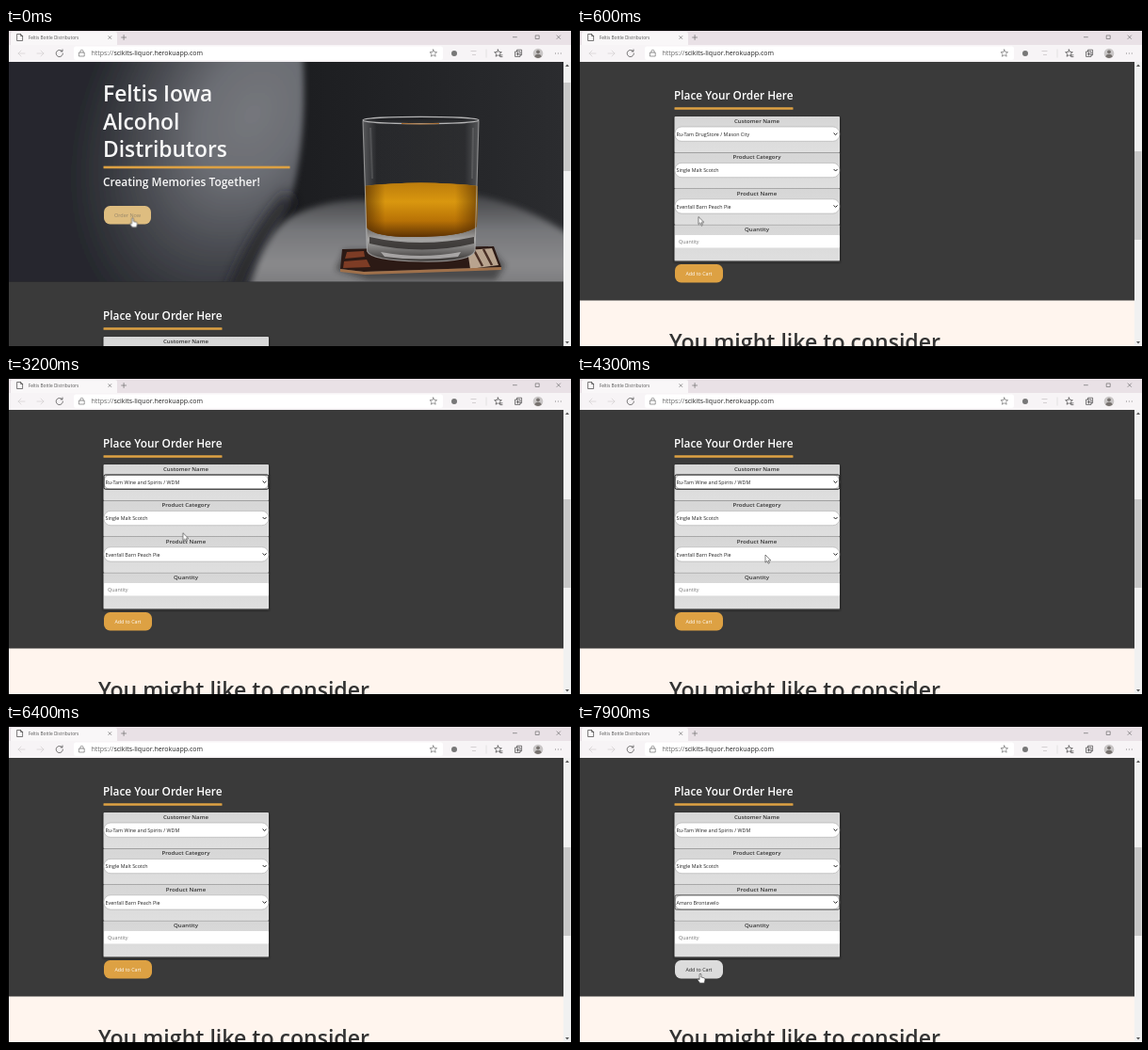
These frames come from a looping animation (600x340 px, 8 s). An HTML page:

```html
<!DOCTYPE html>
<html lang="en">
<head>
<meta charset="utf-8">
<title>Feltis Bottle Distributors</title>
<style>
html, body { margin: 0; width: 100%; height: 100%; overflow: hidden; background: #000; }
svg { display: block; width: 600px; height: 340px; font-family: "Open Sans", "Noto Sans", sans-serif; }
.h { font-weight: 600; }
.mid { text-anchor: middle; }
.label { font-size: 6.1px; font-weight: 600; fill: #333; text-anchor: middle; }
.value { font-size: 5.35px; fill: #222; }
.line { fill: none; stroke: #666; stroke-width: .65; stroke-linecap: round; stroke-linejoin: round; }
.faint { stroke: #cfcbcd; }
.dark { stroke: #333; }

/* 80 ms of the 8 s loop = 1% */
.page, .thumb, .arrow, .hand, .shop1, .shop2, .ring1, .drink1, .drink2 { animation: 8s step-end infinite; }
.page { animation-name: scroll; }
.thumb { animation-name: thumb; }
.arrow { animation-name: arrow; }
.hand { animation-name: hand; }
.shop1 { animation-name: until-shop; }
.shop2 { animation-name: from-shop; }
.ring1 { animation-name: shop-focus; }
.drink1 { animation-name: until-drink; }
.drink2 { animation-name: from-drink; }
.cursor { animation: move 8s linear infinite; }
.order { animation: order 8s linear infinite; }
.order-text { animation: order-text 8s linear infinite; }
.cart { animation: cart 8s linear infinite; }
.cart-text { animation: cart-text 8s linear infinite; }

@keyframes scroll { 0% { transform: none; } 7.5%, 100% { transform: translateY(-234px); } }
@keyframes thumb { 0% { transform: none; } 7.5%, 100% { transform: translateY(73px); } }
@keyframes arrow {
  0% { opacity: 0; } 7.5% { opacity: 1; } 23.75% { opacity: 0; }
  38.75% { opacity: 1; } 57.5% { opacity: 0; } 86.25% { opacity: 1; } 93.75%, 100% { opacity: 0; }
}
@keyframes hand { 0% { opacity: 1; } 7.5% { opacity: 0; } 93.75%, 100% { opacity: 1; } }
@keyframes until-shop { 0% { opacity: 1; } 38.75%, 100% { opacity: 0; } }
@keyframes from-shop { 0% { opacity: 0; } 38.75%, 100% { opacity: 1; } }
@keyframes shop-focus { 0% { opacity: 0; } 38.75% { opacity: 1; } 57.5%, 100% { opacity: 0; } }
@keyframes until-drink { 0% { opacity: 1; } 86.25%, 100% { opacity: 0; } }
@keyframes from-drink { 0% { opacity: 0; } 86.25%, 100% { opacity: 1; } }
@keyframes move {
  0% { transform: translate(134.5px, 201.5px); }
  5%, 11.25% { transform: translate(129px, 200.5px); animation-timing-function: ease-in-out; }
  21.25% { transform: translate(228.5px, 125.5px); }
  22.5%, 38.74% { transform: translate(228.5px, 117.5px); }
  38.75% { transform: translate(186px, 163px); animation-timing-function: ease-out; }
  53.75%, 57.5% { transform: translate(200px, 190px); }
  57.51%, 88% { transform: translate(160px, 134px); animation-timing-function: ease-in-out; }
  96%, 100% { transform: translate(131px, 265px); }
}
@keyframes order { 0% { fill: #debd80; } 5%, 100% { fill: #dcdcdc; } }
@keyframes order-text { 0% { fill: #96866a; } 5%, 100% { fill: #222; } }
@keyframes cart { 0%, 93.75% { fill: #dda143; } 98%, 100% { fill: #dcdcdc; } }
@keyframes cart-text { 0%, 93.75% { fill: #fff; } 98%, 100% { fill: #222; } }
</style>
</head>
<body>
<svg viewBox="0 0 600 340">
  <defs>
    <clipPath id="view"><rect x="3" y="36" width="588.5" height="302"/></clipPath>
    <clipPath id="photo"><rect x="3" y="36" width="589" height="233.5"/></clipPath>
    <linearGradient id="wall" gradientUnits="userSpaceOnUse" x1="300" x2="592">
      <stop offset="0" stop-color="#1c1d20"/><stop offset=".5" stop-color="#232427"/>
      <stop offset="1" stop-color="#2b2c2f"/>
    </linearGradient>
    <radialGradient id="cushion" gradientUnits="userSpaceOnUse" cx="262" cy="92" r="250"
      gradientTransform="rotate(-62 262 92) translate(0 27.6) scale(1 .7)">
      <stop offset="0" stop-color="#75777c"/><stop offset=".3" stop-color="#6b6d73"/>
      <stop offset=".6" stop-color="#4a4c52"/><stop offset=".85" stop-color="#313339"/>
      <stop offset="1" stop-color="#26282d"/>
    </radialGradient>
    <linearGradient id="arm" x2="0" y2="1">
      <stop offset="0" stop-color="#444548"/><stop offset=".3" stop-color="#76777a"/>
      <stop offset=".6" stop-color="#8a8a8c"/><stop offset="1" stop-color="#6a6a6d"/>
    </linearGradient>
    <linearGradient id="whisky" x2="0" y2="1">
      <stop offset="0" stop-color="#bd7d0c"/><stop offset=".35" stop-color="#d9970f"/>
      <stop offset=".7" stop-color="#b87206"/><stop offset="1" stop-color="#5d3203"/>
    </linearGradient>
    <linearGradient id="tint">
      <stop offset="0" stop-color="#4a2600" stop-opacity=".65"/><stop offset=".18" stop-color="#4a2600" stop-opacity="0"/>
      <stop offset=".8" stop-color="#4a2600" stop-opacity="0"/><stop offset="1" stop-color="#4a2600" stop-opacity=".6"/>
    </linearGradient>
    <linearGradient id="base" x2="0" y2="1">
      <stop offset="0" stop-color="#4d4742"/><stop offset=".45" stop-color="#a7a6a5"/>
      <stop offset=".75" stop-color="#6b6968"/><stop offset="1" stop-color="#353230"/>
    </linearGradient>
    <linearGradient id="glass">
      <stop offset="0" stop-color="#fff" stop-opacity=".25"/><stop offset=".12" stop-color="#fff" stop-opacity=".03"/>
      <stop offset=".88" stop-color="#fff" stop-opacity=".03"/><stop offset="1" stop-color="#fff" stop-opacity=".22"/>
    </linearGradient>
    <linearGradient id="row" x2="0" y2="1">
      <stop offset="0" stop-color="#d6d6d6"/><stop offset="1" stop-color="#dfdfdf"/>
    </linearGradient>
    <filter id="soft" x="-30%" y="-30%" width="160%" height="160%"><feGaussianBlur stdDeviation="7"/></filter>
    <filter id="edge" x="-10%" y="-20%" width="120%" height="140%"><feGaussianBlur stdDeviation="3"/></filter>
    <filter id="shade" x="-10%" y="-10%" width="120%" height="120%"><feGaussianBlur stdDeviation="1.2"/></filter>
    <g id="select">
      <rect x="104" y="105" width="174.8" height="15.3" rx="7" fill="#fff" stroke="#aaa" stroke-width=".6"/>
      <path d="M272.6 111.6l2 2 2-2" fill="none" stroke="#222" stroke-width="1"/>
    </g>
    <g id="cell">
      <rect x="103.5" y="94" width="175.5" height="38.3" rx="1" fill="url(#row)"/>
      <path d="M103.5 132.6H279" stroke="#777" stroke-width=".8"/>
    </g>
    <path id="star" d="M0-4l1.1 2.5 2.7.2-2 1.8.6 2.7L0 1.8l-2.4 1.4.6-2.7-2-1.8 2.7-.2z"/>
  </defs>

  <!-- browser -->
  <rect x="3" y="3" width="597" height="335" fill="#f7f4f6"/>
  <rect x="3" y="3" width="597" height="15" fill="#e9e1e6"/>
  <path d="M5 18V6q0-2 2-2H116q2 0 2 2V18z" fill="#f9f7f8"/>
  <path class="line dark" d="M12 6.5h3.6l2 2v5h-5.6zM15.6 6.5v2h2"/>
  <text x="23.8" y="12" font-size="4.75" fill="#555">Feltis Bottle Distributors</text>
  <path class="line" d="M108.8 8.6l3 3m0-3l-3 3M122.6 10h5m-2.5-2.5v5"/>
  <path class="line" d="M538.4 9.7h4M562.6 7.9h3.6v3.6h-3.6zM585 7.9l3.6 3.6m0-3.6l-3.6 3.6"/>
  <rect x="72" y="19.5" width="392" height="14.5" rx="2.5" fill="#fff"/>
  <path class="line faint" d="M20 27h-7m3-3l-3 3 3 3M33 27h7m-3-3l3 3-3 3"/>
  <path class="line dark" d="M59.4 24.5a3.6 3.6 0 1 0 1 2.5M60 22.9v2h-2"/>
  <path class="line" d="M77.8 26h5.4v4h-5.4zM79 26v-1.2a1.5 1.5 0 0 1 3 0V26"/>
  <text x="90.5" y="29.4" font-size="7" fill="#222"><tspan fill="#666">https://</tspan>scikits-liquor.herokuapp.com</text>
  <use href="#star" class="line" x="453.8" y="27"/>
  <circle cx="476" cy="27" r="3" fill="#777"/>
  <path d="M493.5 24.5h6M495 28.5h4" stroke="#d4d0d2"/>
  <path d="M510 22.5v9" stroke="#ddd" stroke-width=".8"/>
  <use href="#star" class="line dark" x="522.5" y="27"/>
  <path class="line dark" d="M525 28.8h2m-2 1.8h2"/>
  <path class="line dark" d="M541 25h5v5.4h-5zM542.6 25v-1.8h5v5.6h-1.6M543.5 26.3v2.8m-1.4-1.4h2.8"/>
  <circle cx="565" cy="27" r="5.3" fill="#c9c6c6"/>
  <circle cx="565" cy="25.3" r="1.9" fill="#77726f"/>
  <path d="M561.3 30.5q.6-2.8 3.7-2.8t3.7 2.8q-3.7 2.8-7.4 0z" fill="#77726f"/>
  <path class="line dark" d="M583.4 27h.1m2.8 0h.1m2.8 0h.1" stroke-width="1"/>
  <rect x="591.5" y="36" width="8.5" height="302" fill="#f1f1f1"/>
  <rect class="thumb" x="592" y="58" width="7.5" height="94" fill="#c8c8c8"/>
  <path d="M594 41l2-2.4 2 2.4zM594 333l2 2.4 2-2.4z" fill="#555"/>

  <g clip-path="url(#view)">
    <g class="page">
      <rect x="3" y="36" width="589" height="500" fill="#3a3a3a"/>

      <!-- hero -->
      <g clip-path="url(#photo)">
        <rect x="3" y="36" width="589" height="234" fill="url(#wall)"/>
        <path d="M-20 10H314Q322 110 303 180Q285 215 252 290H-20z" fill="url(#cushion)" filter="url(#edge)"/>
        <path d="M302 180Q268 215 240 285" fill="none" stroke="#222327" stroke-width="13" filter="url(#soft)"/>
        <path d="M252 300Q270 222 302 201Q345 178 400 184L500 178Q560 190 610 228V300z" fill="url(#arm)" filter="url(#edge)"/>
        <path d="M350 257L385 268H520L530 252 515 236H360z" fill="#1d1c1d" opacity=".55" filter="url(#edge)"/>
        <path d="M357 235L518 232L526 254L380 259L355 256z" fill="#2c1a15"/>
        <path d="M362 238l18-1 1 6-21 2zM359 248l24-2 4 8-29 1z" fill="#7d3c25"/>
        <path d="M490 236l26-2 7 18-30 4z" fill="#b9a48f"/>
        <path d="M497 236l9 17m1-18l9 17" stroke="#4a3026" stroke-width="2.5"/>
        <path d="M355 256l25 3 146-5v3l-145 5-26-3z" fill="#a0714b"/>
        <path d="M379 98L383 237Q387 247 440 247T498 237L502 98z" fill="url(#glass)"/>
        <path d="M383 206L384 237Q387 247 440 248T498 237L500 206z" fill="url(#base)"/>
        <path d="M386 222q54 12 111 0v7q-55 13-111 0z" fill="#2d2a29" opacity=".8"/>
        <path d="M398 238q42 8 85 0l-3 5q-40 5-78 0z" fill="#dcdbda" opacity=".6"/>
        <path id="drink" d="M381 168Q440 161 501 168L500 211Q488 221 440 222T383 212z" fill="url(#whisky)"/>
        <path d="M384 197q25 13 60 6t56-6v9q-55 14-116 2z" fill="#6b3803" opacity=".55"/>
        <path d="M396 206q45 10 92 0l-4 5q-42 7-84 0z" fill="#f0b01e" opacity=".75"/>
        <ellipse cx="441" cy="170" rx="59" ry="5.5" fill="#9a681a"/>
        <g filter="url(#shade)">
          <path d="M391 174l20-6 18 5-4 13-22 4-11-7z" fill="#dfae50"/>
          <path d="M431 171l24-3 10 8-7 13-23-2z" fill="#e8bc62"/>
          <path d="M414 184l20-4 10 10-11 11-20-4zM462 172l23-2 9 7-9 9-19-2z" fill="#d59a2c"/>
          <path d="M395 174l16-4 11 3-16 3zM436 171l17-1 5 4-17 1zM418 187l12-2 3 4-10 2z" fill="#fbedc8"/>
          <path d="M402 190l12 6M446 193l18-4M468 188l16 2" stroke="#7a4505" stroke-width="4"/>
        </g>
        <use href="#drink" style="fill:url(#tint)"/>
        <path d="M381 168Q440 161 501 168L500 211Q488 221 440 222T383 212z" fill="url(#tint)"/>
        <g fill="none" stroke="#b5b5b6">
          <ellipse cx="440.5" cy="98" rx="61.5" ry="3.6" stroke-width="1.2"/>
          <path d="M379 99L383.5 237Q387 247 440 248T498 237L502 99" stroke-width="1.1" opacity=".7"/>
          <path d="M387 106l2 54M496 106l-1 54" stroke-width="2" opacity=".18"/>
        </g>
        <path d="M420 101.5q20 1 40 0" stroke="#a86a2c" fill="none"/>
      </g>
      <g class="h" fill="#f8f8f8">
        <g font-size="22.8">
          <text x="103" y="78">Feltis Iowa</text>
          <text x="103" y="107.5">Alcohol</text>
          <text x="103" y="137">Distributors</text>
        </g>
        <text x="103" y="168" font-size="11.95">Creating Memories Together!</text>
      </g>
      <rect x="103.5" y="146.7" width="198" height="2.6" fill="#dda143"/>
      <rect class="order" x="104" y="189" width="50" height="19.5" rx="6.5"/>
      <text class="order-text mid" x="129" y="201" font-size="5.5">Order Now</text>

      <!-- order form -->
      <g transform="translate(0 234)">
        <text class="h" x="103" y="76.3" font-size="11.85" fill="#fff">Place Your Order Here</text>
        <rect x="103.5" y="84.2" width="126" height="2.6" rx=".5" fill="#dda143"/>
        <rect x="103" y="95" width="176.5" height="154" fill="#111" opacity=".7" filter="url(#shade)"/>
        <use href="#cell"/><use href="#cell" y="38.4"/><use href="#cell" y="76.8"/><use href="#cell" y="115.2"/>
        <use href="#select"/><use href="#select" y="38.4"/><use href="#select" y="76.8"/>
        <rect x="104" y="220" width="175" height="13.4" rx="1" fill="#fff"/>
        <text class="label" x="191" y="101">Customer Name</text>
        <text class="label" x="191" y="139.4">Product Category</text>
        <text class="label" x="191" y="177.8">Product Name</text>
        <text class="label" x="191" y="216.2">Quantity</text>
        <rect class="ring1" x="104" y="105" width="174.8" height="15.2" rx="1.5" fill="none" stroke="#111"/>
        <rect class="drink2" x="104" y="181.9" width="174.8" height="15.2" rx="1.5" fill="none" stroke="#333" stroke-width=".8"/>
        <g class="value">
          <text class="shop1" x="105.5" y="115">Ru-Tam DrugStore / Mason City</text>
          <text class="shop2" x="105.5" y="115">Ru-Tam Wine and Spirits / WDM</text>
          <text x="105.5" y="153.4">Single Malt Scotch</text>
          <text class="drink1" x="105.5" y="191.8">Evenfall Barn Peach Pie</text>
          <text class="drink2" x="105.5" y="191.8">Amaro Brontavelo</text>
          <text x="108" y="229" fill="#777">Quantity</text>
        </g>
        <rect class="cart" x="104" y="251" width="51" height="19.5" rx="6.5"/>
        <text class="cart-text mid" x="129.5" y="263" font-size="5.3">Add to Cart</text>
        <rect x="3" y="289.5" width="589" height="60" fill="#fff5ee"/>
        <text class="h" x="98" y="342" font-size="23.1" fill="#333">You might like to consider</text>
      </g>
    </g>
  </g>

  <g class="cursor" stroke="#333" stroke-width=".6" stroke-linejoin="round" fill="#fff">
    <path class="arrow" d="M0 0V8.2L1.9 6.5 3.1 9.2 4.4 8.6 3.2 6H5.8z"/>
    <path class="hand" d="M-.9 .8Q0-.7 .9 .8V4L4 4.8Q5.2 5.2 5 6.8L4.2 10.2H-.4L-3 7Q-3 5.4-.9 6.5z"/>
  </g>
</svg>
</body>
</html>
```
